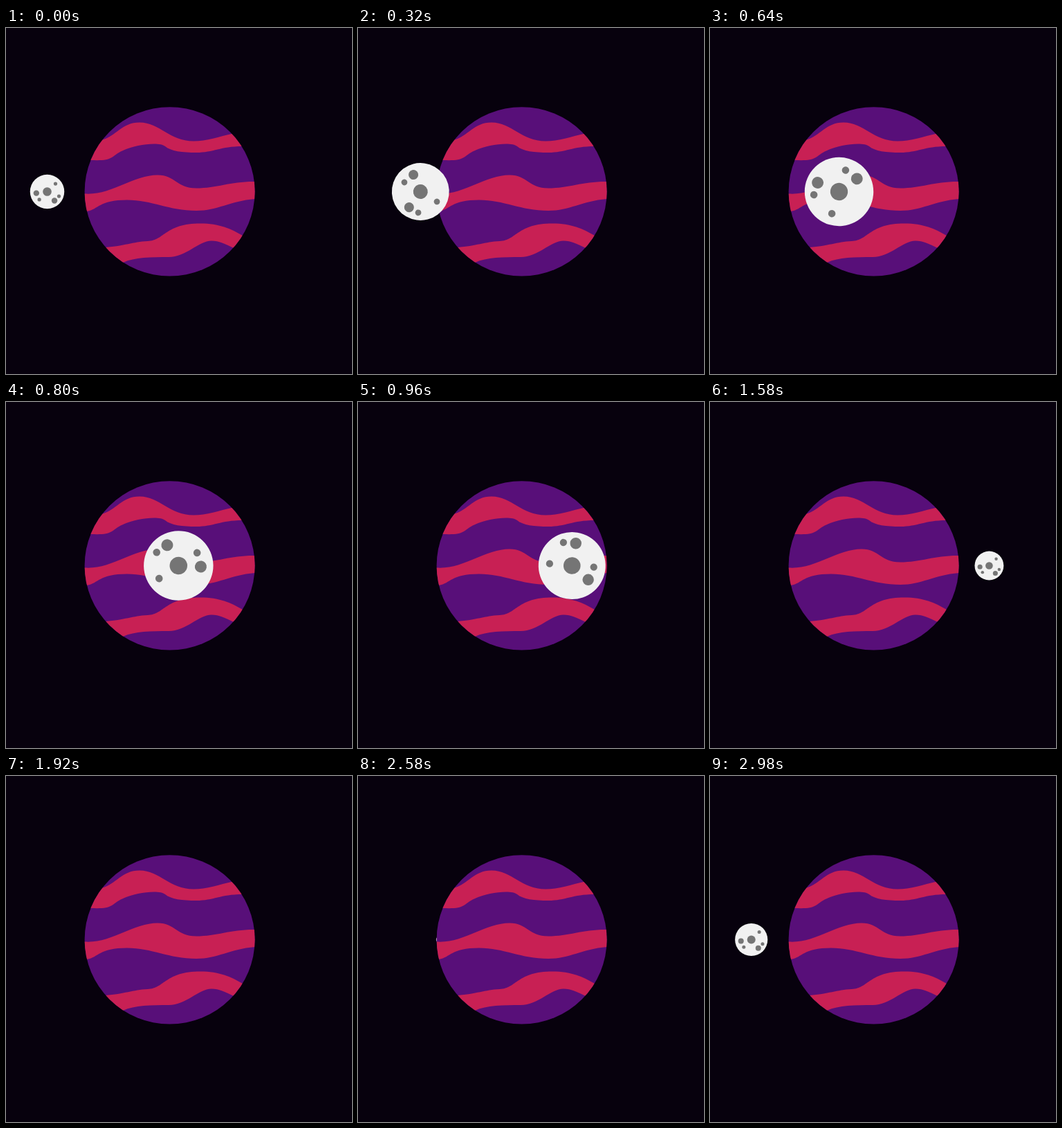
Animation, 500 px wide and 500 px high, one loop 3 s. Source, as an HTML page with a canvas:

```html
<!DOCTYPE html>
<html lang="en">
<head>
<meta charset="utf-8">
<title>Moon orbit</title>
<style>
  html, body { margin: 0; width: 100%; height: 100%; overflow: hidden; background: #07010d; }
  canvas { display: block; }
</style>
</head>
<body>
<canvas width="500" height="500"></canvas>
<script>
const ctx = document.querySelector('canvas').getContext('2d');
const LOOP = 3000, HALF = LOOP / 2, LAG = 8;

const bands = new Path2D(`
  M110 168 L138 162 C160 156 167 136.5 193 136.5 C222 136.5 236 163.5 271 163.5
  C290 163.5 308 157 328 152.5 L350 148 V171 H341 C310 171 300 180 275 180
  C255 180 238 178 230 171 C224 166 206 167 191 170 C162 177 160 183 153 187
  C146 191 140 191.5 122 191 H100 Z
  M100 239 L114 239.5 C152 242 184 212.5 219 212.5 C245 212.5 246 231.5 275 231.5
  C305 231.5 325 221.5 360 222 H370 V246 L360 247 C323 250 306 264 275 264
  C235 264 211 248.5 175 248.5 C134 248.5 134 262 117 265 L100 268 Z
  M130 318 L144 317 C171 315 183 309 205 308 C229 307 230 282.5 281 282.5
  C308 282.5 325 290 342 300 L350 330 L329 318 C316 312 308 307.5 297 307.5
  C278 307.5 261 331 235 331 C210 331 186 331 169 339 L140 350 Z`);

// x, y, radius on a moon of radius 50
const craters = [
  [0, 0, 12.7], [-31.7, 4.3, 8.5], [21.3, 26.2, 8.5],
  [24.2, -23.2, 5.3], [-23, 23, 5.3], [34.4, 13.2, 5.3]
];

// cubic-bezier(.42, 0, .58, 1)
function easeInOut(x) {
  let lo = 0, hi = 1;
  for (let i = 0; i < 24; i++) {
    const s = (lo + hi) / 2, r = 1 - s;
    if (1.26 * r * r * s + 1.74 * r * s * s + s * s * s < x) lo = s; else hi = s;
  }
  return lo * lo * (3 - 2 * lo);
}

// Eased swing 0 -> 1 -> 0 over one loop
function swing(t) {
  const u = ((t + LOOP) % LOOP) / HALF;
  return easeInOut(u < 1 ? u : 2 - u);
}

function disc(x, y, rx, ry, color) {
  ctx.fillStyle = color;
  ctx.beginPath();
  ctx.ellipse(x, y, rx, ry, 0, 0, 2 * Math.PI);
  ctx.fill();
}

function drawPlanet() {
  ctx.save();
  disc(236.6, 236.4, 123, 122.2, '#580f79');
  ctx.clip();
  ctx.fillStyle = '#c82054';
  ctx.fill(bands);
  ctx.restore();
}

function drawMoon(t) {
  const scale = 1.006 * swing(t + HALF / 2);
  ctx.save();
  ctx.translate(59.5 + 345.5 * swing(t), 236.5);
  ctx.scale(scale, scale);
  ctx.rotate(2 * Math.PI * Math.min(t / HALF, 1));
  disc(0, 0, 50, 50, '#f1f1f1');
  for (const [x, y, r] of craters) disc(x, y, r, r, '#757575');
  ctx.restore();
}

function frame() {
  const t = (performance.now() + LOOP - LAG) % LOOP;
  ctx.clearRect(0, 0, 500, 500);
  if (t < HALF) {
    drawPlanet();
    drawMoon(t);
  } else {
    drawMoon(t);
    drawPlanet();
  }
  requestAnimationFrame(frame);
}
frame();
</script>
</body>
</html>
```
